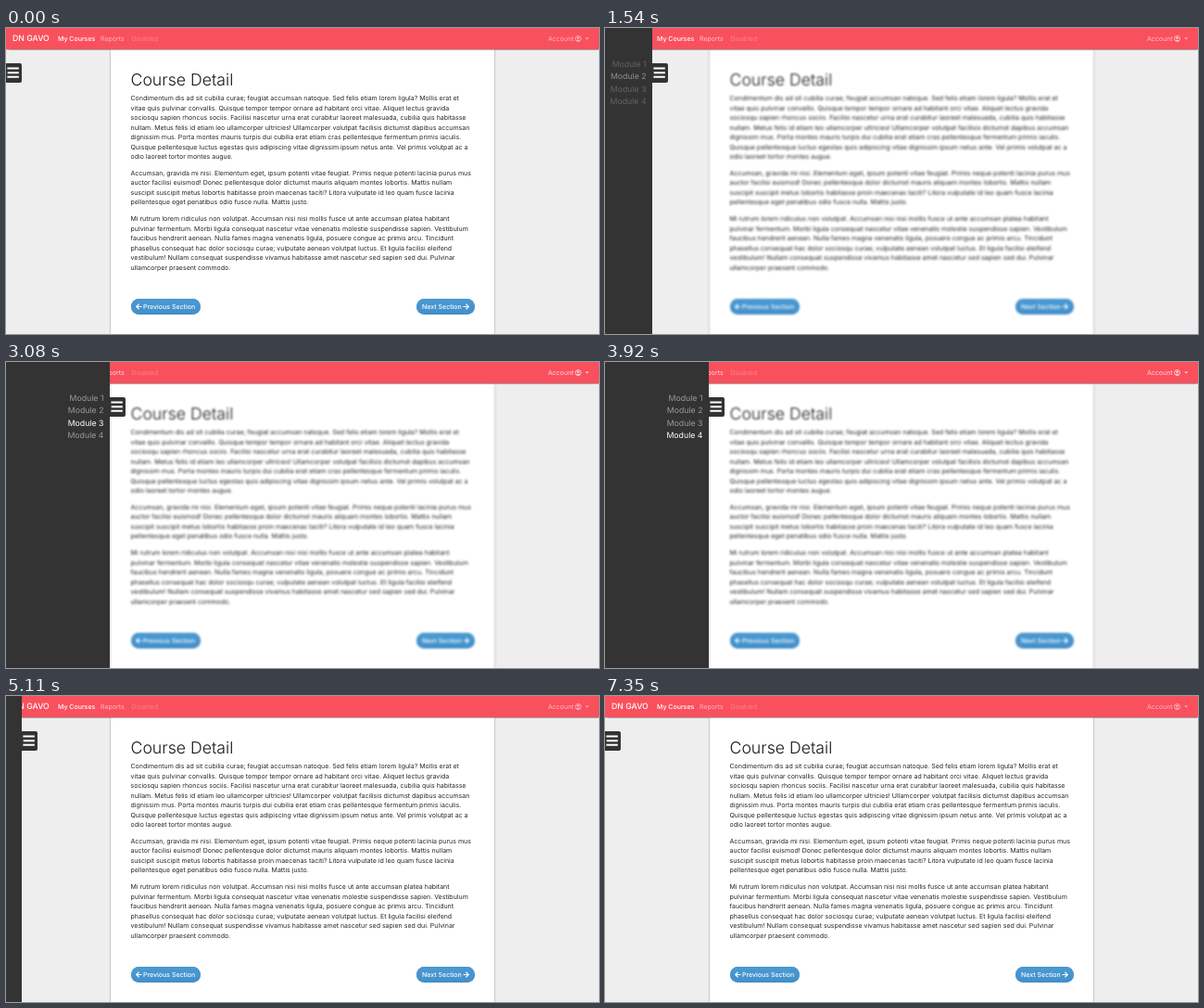
Recreate the animation shown at these times as an HTML page. Size 640x330 px, loop 7.42 s.

```html
<!DOCTYPE html>
<html lang="en">
<head>
<meta charset="utf-8">
<title>Course Detail</title>
<style>
html, body { margin: 0; width: 100%; height: 100%; overflow: hidden; }
body { position: relative; background: #eee; color: #212529; font: 7px/10.5px Inter, sans-serif;
  white-space: nowrap; text-rendering: geometricPrecision; }
nav, nav > *, main, main > *, aside, aside > *, #toggle { position: absolute; }
nav { left: 0; top: 0; width: 640px; height: 23px; background: #f9505e; color: #fff; box-shadow: 0 .5px 1px rgba(0,0,0,.3); }
nav > span { top: 6.9px; }
nav > .brand { left: 7px; font-size: 8.75px; font-weight: 500; }
main { left: 113px; top: 23px; width: 414px; height: 320px; background: #fff; box-shadow: 0 0 1.5px rgba(0,0,0,.55); }
h1 { left: 21.5px; top: 22.7px; margin: 0; color: #16181b; font: 300 17.7px/22px Inter, sans-serif; }
p { left: 21.5px; margin: 0; }
.button { top: 269px; height: 17px; border-radius: 9px; background: linear-gradient(#4b9ad4, #428fca);
  color: #fff; font-weight: 500; line-height: 17px; box-shadow: inset 0 0 .5px .3px #3b82ba; }
.button span, .button svg { position: absolute; }
.button svg { top: 4.7px; }
aside { left: 0; top: 0; height: 330px; overflow: hidden; background: #333; }
aside span { right: 6.5px; font-size: 8.75px; line-height: 14px; }
#toggle { top: 38px; width: 17.2px; height: 21px; border-radius: 0 2px 2px 0; background: #333; }
svg { display: block; overflow: visible; fill: none; stroke: #fff; }
</style>
</head>
<body>
<main id="panel">
  <h1>Course Detail</h1>
  <p style="top:48.4px">Condimentum dis ad sit cubilia curae; feugiat accumsan natoque. Sed felis etiam lorem ligula? Mollis erat et<br>
vitae quis pulvinar convallis. Quisque tempor tempor ornare ad habitant orci vitae. Aliquet lectus gravida<br>
sociosqu sapien rhoncus sociis. Facilisi nascetur urna erat curabitur laoreet malesuada, cubilia quis habitasse<br>
nullam. Metus felis id etiam leo ullamcorper ultricies! Ullamcorper volutpat facilisis dictumst dapibus accumsan<br>
dignissim mus. Porta montes mauris turpis dui cubilia erat etiam cras pellentesque fermentum primis iaculis.<br>
Quisque pellentesque luctus egestas quis adipiscing vitae dignissim ipsum netus ante. Vel primis volutpat ac a<br>
odio laoreet tortor montes augue.</p>
  <p style="top:128.9px">Accumsan, gravida mi nisi. Elementum eget, ipsum potenti vitae feugiat. Primis neque potenti lacinia purus mus<br>
auctor facilisi euismod! Donec pellentesque dolor dictumst mauris aliquam montes lobortis. Mattis nullam<br>
suscipit suscipit metus lobortis habitasse proin maecenas taciti? Litora vulputate id leo quam fusce lacinia<br>
pellentesque eget penatibus odio fusce nulla. Mattis justo.</p>
  <p style="top:178.4px">Mi rutrum lorem ridiculus non volutpat. Accumsan nisi nisi mollis fusce ut ante accumsan platea habitant<br>
pulvinar fermentum. Morbi ligula consequat nascetur vitae venenatis molestie suspendisse sapien. Vestibulum<br>
faucibus hendrerit aenean. Nulla fames magna venenatis ligula, posuere congue ac primis arcu. Tincidunt<br>
phasellus consequat hac dolor sociosqu curae; vulputate aenean volutpat luctus. Et ligula facilisi eleifend<br>
vestibulum! Nullam consequat suspendisse vivamus habitasse amet nascetur sed sapien sed dui. Pulvinar<br>
ullamcorper praesent commodo.</p>
  <div class="button" style="left:21.5px;width:75.5px">
    <svg style="left:5px" width="7" height="7"><path d="M6.5 3.5H1M3.6 .7L.8 3.5l2.8 2.8" stroke-width="1.2"/></svg>
    <span style="left:13.5px">Previous Section</span>
  </div>
  <div class="button" style="left:330px;width:63px">
    <span style="left:6px">Next Section</span>
    <svg style="left:50px" width="7" height="7"><path d="M.5 3.5H6M3.4 .7l2.8 2.8-2.8 2.8" stroke-width="1.2"/></svg>
  </div>
</main>
<nav>
  <span class="brand">DN GAVO</span>
  <span style="left:56px;font-weight:500">My Courses</span>
  <span class="link" style="left:102px">Reports</span>
  <span style="left:135.5px;opacity:.27">Disabled</span>
  <span class="link" style="left:585px">Account</span>
  <svg class="link" style="left:614px;top:8px" width="16" height="7">
    <circle cx="3.5" cy="3.5" r="3" stroke-width=".9"/>
    <circle cx="3.5" cy="2.7" r="1.3" fill="#fff" stroke="none"/>
    <path d="M1.4 5.7Q3.5 3.6 5.6 5.7Q3.5 7.3 1.4 5.7" fill="#fff" stroke="none"/>
    <path d="M11.2 2.4h4l-2 2z" fill="#fff" stroke="none"/>
  </svg>
</nav>
<aside id="sidebar"></aside>
<div id="toggle"><svg width="17" height="21"><path d="M1.4 5.6h12.4M1.7 10.2h12.1M1.4 14.8h12.4" stroke-width="2"/></svg></div>
<script>
const LOOP = 7420, OPEN = 1405, CLOSE = 4834, SLIDE = 500, WIDTH = 112;
const $ = id => document.getElementById(id);
const panel = $('panel'), sidebar = $('sidebar'), toggle = $('toggle');
const links = document.querySelectorAll('.link');
const modules = [1, 2, 3, 4].map((n, i) => {
  const item = document.createElement('span');
  item.textContent = 'Module ' + n;
  item.style.top = 32.9 + i * 13.4 + 'px';
  sidebar.append(item);
  return item;
});

const clamp = x => Math.min(1, Math.max(0, x));
const ramp = (t, start, length) => clamp((t - start) / length);

// CSS "ease": cubic-bezier(.25, .1, .25, 1)
function ease(x) {
  const bezier = (s, a, b) => 3 * s * (1 - s) ** 2 * a + 3 * s * s * (1 - s) * b + s ** 3;
  let low = 0, high = 1;
  for (let i = 0; i < 20; i++) {
    const mid = (low + high) / 2;
    if (bezier(mid, .25, .25) < x) low = mid; else high = mid;
  }
  return bezier(high, .1, 1);
}

const fade = (t, start, length) => ease(ramp(t, start, length));

function hover(t) {
  return [
    0,
    1 - fade(t, 2020, 220),
    fade(t, 1965, 65) - fade(t, 3420, 260),
    fade(t, 3420, 260) - fade(t, 3925, 250)
  ];
}

function draw(t) {
  const opening = fade(t, OPEN, SLIDE);
  const shown = opening - fade(t, CLOSE, SLIDE);
  const isOpen = t >= OPEN && t < CLOSE;
  sidebar.style.width = toggle.style.left = WIDTH * shown + 'px';
  panel.style.filter = isOpen ? 'blur(.9px)' : 'none';
  links.forEach(link => link.style.opacity = .58 + .2 * shown);
  const glow = hover(t);
  modules.forEach((item, i) => {
    const level = Math.round(153 + 102 * glow[i]);
    item.style.color = `rgb(${level},${level},${level})`;
    item.style.opacity = isOpen ? opening : 0;
  });
}

function tick() {
  draw(performance.now() % LOOP);
  requestAnimationFrame(tick);
}
tick();
</script>
</body>
</html>
```
